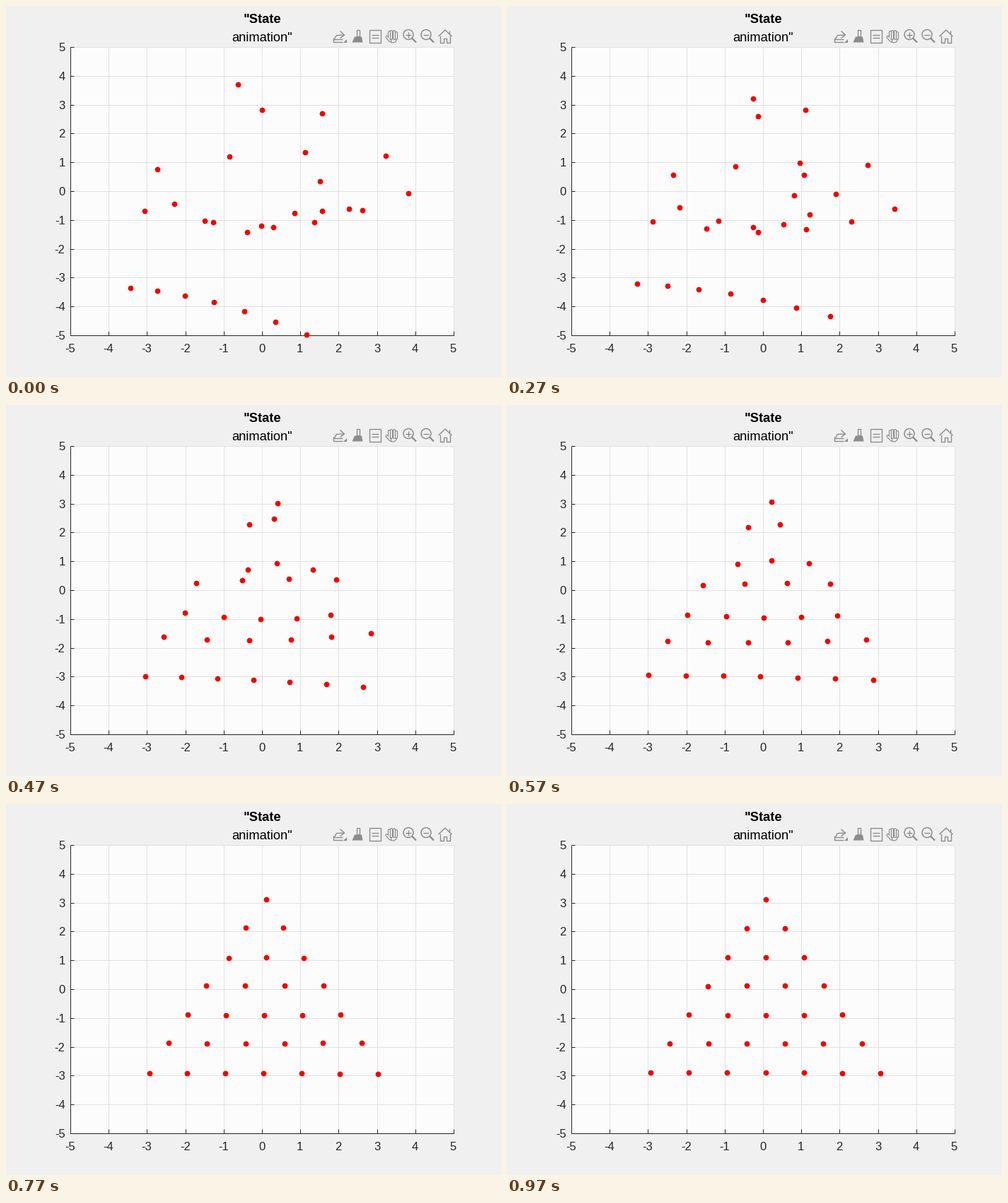
Animation of 700x525 px, one loop 1010 ms. Source, as a matplotlib script:

```python
import numpy as np
import matplotlib.pyplot as plt
from matplotlib.animation import FuncAnimation
from matplotlib.patches import Circle, Polygon, Rectangle

WIDTH, HEIGHT, DPI = 700, 525, 100
PX = 72 / DPI                      # points per pixel
LEFT, RIGHT, TOP, BOTTOM = 91, 633, 58, 466
UNIT_X, UNIT_Y = 54.2, 40.85

PAPER = "#f0f0f0"
PLOT = "#fcfcfd"
GRID = "#e1e1e4"
INK = "#262626"
ICON = "#8c8c8a"
RED = "#f00500"

ROWS = 7
POSES = 30
TICKS = 101                        # 10 ms each

plt.rcParams["font.family"] = "Liberation Sans"
fig = plt.figure(figsize=(WIDTH / DPI, HEIGHT / DPI), dpi=DPI, facecolor=PAPER)
ax = fig.add_axes([0, 0, 1, 1])
ax.set_xlim(0.5, WIDTH + 0.5)      # whole numbers are pixel centres
ax.set_ylim(HEIGHT + 0.5, 0.5)
ax.axis("off")


def to_pixels(points):
    x, y = np.asarray(points).T
    return np.column_stack([LEFT + UNIT_X * (x + 5), TOP + UNIT_Y * (5 - y)])


def triangle():
    return to_pixels([(0.08 + col - row / 2, 3.1 - row)
                      for row in range(ROWS) for col in range(row + 1)])


def scatter():
    """Each row starts spread along a bowed line between two end points."""
    ends = [((1.57, 2.69), (1.57, 2.69)), ((0.01, 2.81), (-0.61, 3.69)),
            ((1.57, -0.70), (2.27, -0.63)), ((-2.72, 0.76), (3.23, 1.23)),
            ((-2.27, -0.44), (0.86, -0.77)), ((-3.06, -0.69), (3.82, -0.08)),
            ((-3.42, -3.35), (1.18, -4.97))]
    rows = []
    for row, (first, last) in enumerate(ends):
        along = np.linspace(0, 1, row + 1)
        bow = np.cos(2 * np.pi * (row - 2) / 5) * np.sin(np.pi * along)
        rows.append(np.linspace(first, last, row + 1)
                    + np.outer(bow, (-0.4, 1)))
    return to_pixels(np.vstack(rows))


def remaining(pose):
    """Exponential decay whose rate ramps up smoothly from near zero."""
    rate, middle, spread = 0.265, 8.5, 2.4
    ramp = np.logaddexp(0, (pose - middle) / spread)
    return np.exp(-rate * spread * (ramp - np.logaddexp(0, -middle / spread)))


def stroke(points, color=ICON, width=1.4, cap="butt"):
    xs, ys = zip(*points)
    ax.plot(xs, ys, color=color, lw=width * PX, solid_capstyle=cap,
            solid_joinstyle="round")


def box(x, y, w, h, **style):
    ax.add_patch(Rectangle((x, y), w, h, **style))


def label(x, y, text, size=16.67, ha="center", color=INK, weight="normal"):
    ax.text(x, y, text, fontsize=size * PX, ha=ha, va="baseline",
            color=color, weight=weight)


def draw_axes():
    box(LEFT, TOP, RIGHT - LEFT, BOTTOM - TOP, fc=PLOT, ec="none")
    xs = np.linspace(LEFT, RIGHT, 11).round()
    ys = np.linspace(TOP, BOTTOM, 11).round()
    for x, y in zip(xs, ys):
        stroke([(x, TOP), (x, BOTTOM)], GRID, 1)
        stroke([(LEFT, y), (RIGHT, y)], GRID, 1)
    stroke([(LEFT, TOP), (LEFT, BOTTOM), (RIGHT, BOTTOM)], INK, 1)
    for k, (x, y) in enumerate(zip(xs, ys)):
        stroke([(x, BOTTOM), (x, BOTTOM - 5.5)], INK, 1)
        stroke([(LEFT, y), (LEFT + 5.5, y)], INK, 1)
        label(x, 491, str(k - 5))
        label(84, y + 6.5, str(5 - k), ha="right")
    label(362.5, 24, '"State', 18.3, color="black", weight="bold")
    label(362.5, 50, 'animation"', 18.3, color="black")


def draw_export():
    stroke([(463, 45), (463, 51), (476, 51)])
    stroke([(463, 47.5), (476, 47.5)])
    stroke([(465, 47), (468, 42), (479, 41.5)])
    stroke([(473, 36), (479, 41.5), (473, 46)])
    ax.add_patch(Polygon([(482, 47), (482, 52), (477, 52)], fc=ICON))


def draw_brush():
    box(496.5, 34, 4, 9, fill=False, ec=ICON, lw=1.4 * PX)
    ax.add_patch(Polygon([(493.5, 44), (503.5, 44), (505, 52), (490, 52)],
                         fc=ICON))


def draw_data_tip():
    box(514, 34.5, 16, 17.5, fill=False, ec=ICON, lw=1.4 * PX)
    for y in (41, 45.5):
        stroke([(517.5, y), (527, y)])


def draw_hand():
    fingers = [(542.5 + 3.3 * k, 36.5 + 0.8 * (k - 1.3) ** 2)
               for k in range(4)]
    for color, grow in ((ICON, 1.2), (PAPER, 0)):
        for x, top in fingers:
            stroke([(x, top), (x, 46)], color, 1.8 + 2 * grow, "round")
        stroke([(539, 44.5), (544, 50)], color, 1.8 + 2 * grow, "round")
        ax.add_patch(Circle((547.5, 47), 4.8 + grow, fc=color))


def draw_magnifier(x, plus):
    ax.add_patch(Circle((x, 41), 7, fill=False, ec=ICON, lw=1.5 * PX))
    stroke([(x + 5, 46), (x + 11, 52)], width=2.3)
    stroke([(x - 4, 41), (x + 4, 41)])
    if plus:
        stroke([(x, 37), (x, 45)])


def draw_home():
    stroke([(612, 43.5), (621.5, 34.5), (631, 43.5)])
    stroke([(627.5, 35), (627.5, 40)])
    for side in (-1, 1):
        stroke([(621.5 + side * dx, y)
                for dx, y in ((7, 42), (7, 52), (2.3, 52), (2.3, 46), (0, 46))])


draw_axes()
draw_export()
draw_brush()
draw_data_tip()
draw_hand()
draw_magnifier(569.5, plus=True)
draw_magnifier(594.5, plus=False)
draw_home()

start, goal = scatter(), triangle()
dots, = ax.plot([], [], "o", ms=7.8 * PX, color=RED, mew=0, zorder=5)


def update(tick):
    pose = min((3 * tick + 1) // 10, POSES - 1)
    dots.set_data(*(goal + (start - goal) * remaining(pose)).T)
    return dots,


anim = FuncAnimation(fig, update, frames=TICKS, interval=10, repeat=True,
                     repeat_delay=0, blit=False)
plt.show()
```
